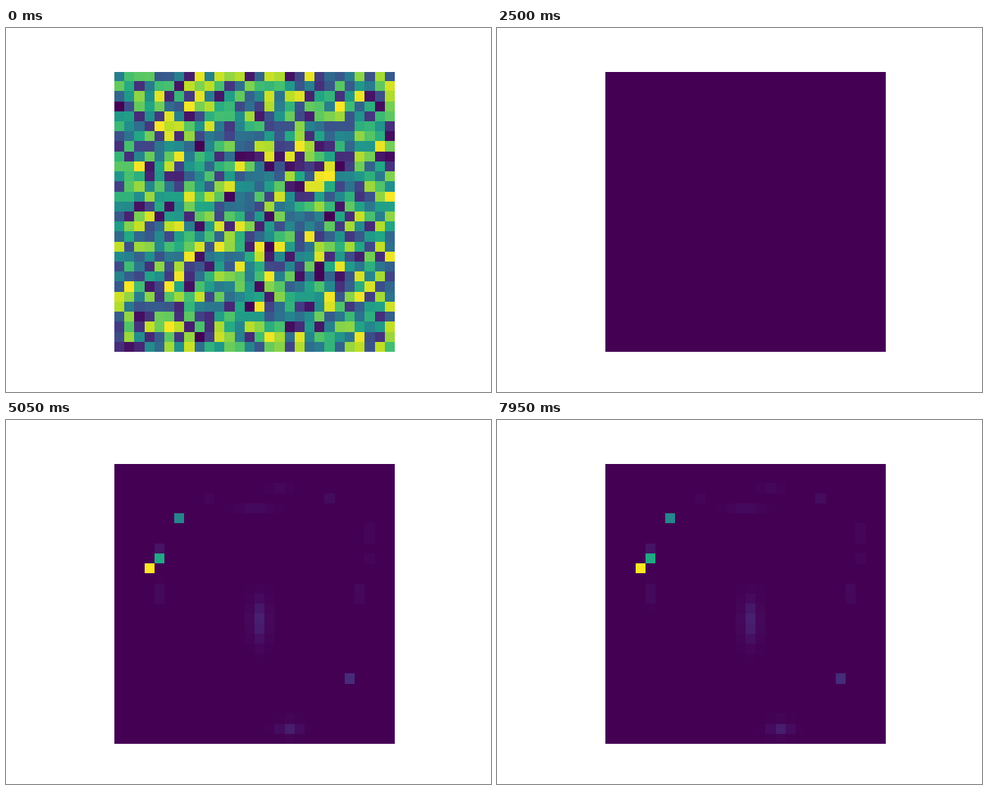
An HTML page with a canvas for the animation above (8000 ms loop, 640x480 px).

```html
<!DOCTYPE html>
<html lang="en">
<head>
<meta charset="utf-8">
<title>Flickering grid</title>
<style>
  html, body { margin: 0; width: 100%; height: 100%; overflow: hidden; background: #fff; }
  canvas { position: absolute; left: 0; top: 0; }
</style>
</head>
<body>
<script>
const STEP = 50, LOOP = 8000;
const CELLS = 28, LEFT = 143, TOP = 57, SIZE = 370;
const VIRIDIS = ['440154', '482475', '414487', '355f8d', '2a788e', '21918c',
  '22a884', '44bf70', '7ad151', 'bddf26', 'fde725']
  .map(hex => [0, 2, 4].map(i => parseInt(hex.slice(i, i + 2), 16)));

// Gaussian glow around a cell; the default spread stays within that cell.
const glow = (x, y, peak, width = 0.35, height = 0.35) => (col, row) =>
  peak * Math.exp(-(((col - x) / width) ** 2) - ((row - y) / height) ** 2);

const GLOWS = [
  glow(3, 10, 1), glow(4, 9, 0.6), glow(6, 5, 0.45), glow(23, 21, 0.125),
  glow(14, 15.2, 0.09, 0.8, 2), glow(17, 26, 0.08, 1, 0.7),
  glow(4, 8, 0.05), glow(4, 12.5, 0.033, 0.35, 0.9),
  glow(24, 12.4, 0.03, 0.35, 0.8), glow(25, 6.5, 0.02, 0.35, 0.9), glow(25, 9, 0.015),
  glow(21, 3, 0.03), glow(9, 3, 0.015), glow(16, 2, 0.018, 0.9),
  glow(13.5, 4, 0.025, 1.8)
];

function color(value) {
  const place = value * (VIRIDIS.length - 1);
  const i = Math.min(Math.floor(place), VIRIDIS.length - 2);
  const mix = VIRIDIS[i].map((c, k) => Math.round(c + (VIRIDIS[i + 1][k] - c) * (place - i)));
  return `rgb(${mix})`;
}

// Cell borders snap to whole pixels, halves downwards.
const edge = (start, i) => Math.ceil(start + i * SIZE / CELLS - 0.5);

function heatmap(valueAt) {
  const canvas = document.createElement('canvas');
  canvas.width = 640;
  canvas.height = 480;
  const ctx = canvas.getContext('2d');
  for (let row = 0; row < CELLS; row++) {
    for (let col = 0; col < CELLS; col++) {
      const x = edge(LEFT, col), y = Math.max(edge(TOP, row), TOP + 1);
      ctx.fillStyle = color(valueAt(col, row));
      ctx.fillRect(x, y, edge(LEFT, col + 1) - x, edge(TOP, row + 1) - y);
    }
  }
  document.body.append(canvas);
  return canvas;
}

function seeded(seed) {
  return () => {
    seed = (seed + 0x6d2b79f5) | 0;
    let t = Math.imul(seed ^ (seed >>> 15), 1 | seed);
    t = (t + Math.imul(t ^ (t >>> 7), 61 | t)) ^ t;
    return ((t ^ (t >>> 14)) >>> 0) / 4294967296;
  };
}

heatmap(() => 0);
const spots = heatmap((col, row) => Math.max(...GLOWS.map(at => at(col, row))));
const noise = heatmap(seeded(28));

spots.animate([{ opacity: 0 }, { opacity: 1 }],
  { duration: 2 * STEP, iterations: Infinity, easing: 'steps(2, jump-none)' });

noise.animate([
  { opacity: 1, offset: 0, easing: 'step-end' },
  { opacity: 0, offset: STEP / LOOP },
  { opacity: 0, offset: 1 }
], { duration: LOOP, iterations: Infinity });
</script>
</body>
</html>
```
